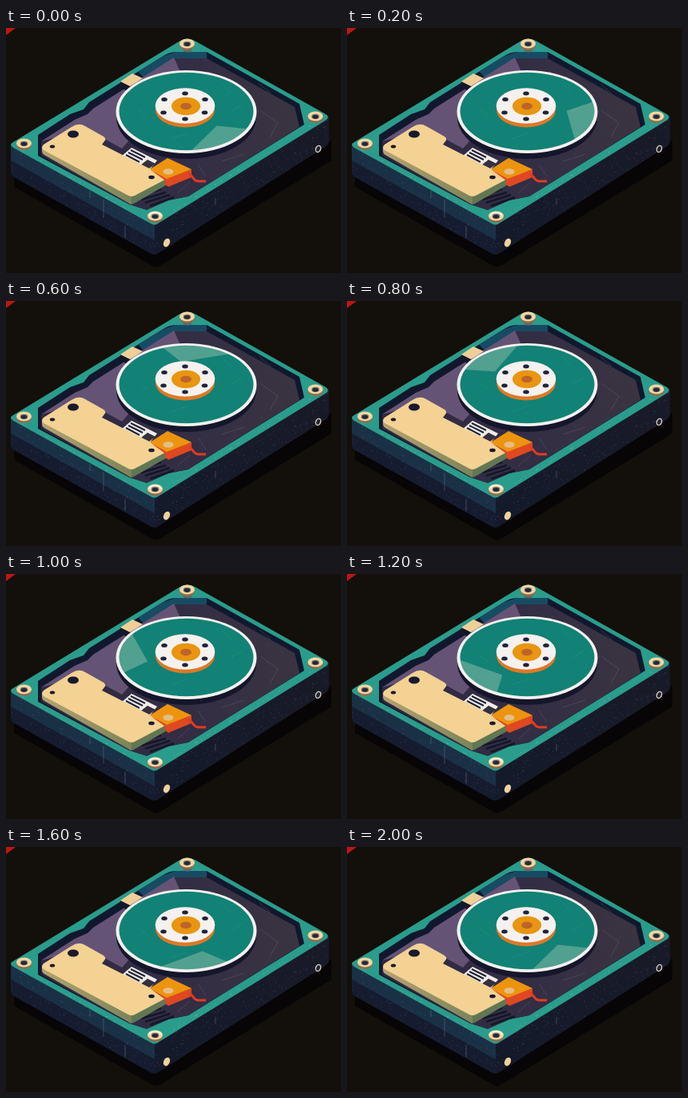
Animation, 419 px wide and 307 px high, one loop 2.1 s. Source, as an HTML page:

```html
<!DOCTYPE html>
<html lang="en">
<head>
<meta charset="utf-8">
<title>Hard disk</title>
<style>
html, body { margin: 0; width: 100%; height: 100%; overflow: hidden; background: #130f0b; }
svg { display: block; width: 419px; height: 307px; }
</style>
</head>
<body>
<svg viewBox="0 0 419 307">
  <defs>
    <clipPath id="wellClip"><path id="wellShape" d="M40 134L80 108L97 102L104 93L195 36Q204 30 212 30H251L367 95L373 121L228 211L203 216L176 228L154 221L40 160Z"/></clipPath>
    <clipPath id="sideClip"><path d="M6 148L186 248L404 112V145L186 284L7 184Z"/></clipPath>
    <linearGradient id="floor" x1="0" x2="1"><stop offset="0" stop-color="#2e2942"/><stop offset=".6" stop-color="#332e44"/><stop offset="1" stop-color="#3a3441"/></linearGradient>
    <linearGradient id="right" x1="0" x2="1"><stop offset="0" stop-color="#141a2b"/><stop offset="1" stop-color="#191a28"/></linearGradient>
    <linearGradient id="rim" x1="0" x2="1"><stop offset="0" stop-color="#b5a371"/><stop offset="1" stop-color="#7b8459"/></linearGradient>
    <g id="screw">
      <ellipse cy="2.5" rx="9.5" ry="6" fill="#8f6b4c"/>
      <ellipse rx="9.5" ry="6" fill="#f3d6a2"/>
      <ellipse cy=".5" rx="4.8" ry="3.2" fill="#77706c"/>
      <ellipse cy=".8" rx="3.6" ry="2.4" fill="#25273a"/>
    </g>
  </defs>

  <path d="M0 0H12L0 9Z" fill="#bd1712"/>
  <path d="M10 184V199L183 298Q188 301 194 297L407 166V140L186 276Z" fill="#070505"/>

  <!-- case -->
  <path d="M6 146L186 246V284Q182 284 178 281L10 187Q6 185 6 180Z" fill="#151c30"/>
  <path d="M6 146L186 246V266L6 166Z" fill="#1a3045"/>
  <path d="M186 246L404 110V141Q404 146 399 149L191 282Q188 284 186 284Z" fill="url(#right)"/>
  <g clip-path="url(#sideClip)">
    <path id="dust" stroke="#7a8294" stroke-width=".8" opacity=".5"/>
    <path d="M122 215V238M149 248V268M105 204V213M262 213V222" stroke="#71849a" stroke-width=".8" opacity=".55"/>
  </g>
  <path d="M9 143L217 16.5Q227 10.5 237 16.5L400 108Q405 111 401 115L190 245Q186 248 181 245L9 150Q3 146 9 143Z" fill="#2a9c8b"/>

  <!-- well -->
  <use href="#wellShape" fill="#11182d"/>
  <g clip-path="url(#wellClip)">
    <path d="M165 54L195 36L212 30H251V38H215L172 62Z" fill="#174b64"/>
    <path d="M44 142L86 115L102 108L109 101L209 38H251L361 99L367 124L228 211L203 216L176 228L154 221L44 160Z" fill="url(#floor)"/>
    <path d="M44 142L86 115L102 108L109 101L210 37L218 55L190 100L145 151L101 127Z" fill="#655375"/>
    <path d="M165 211L194 202M169 215L200 206M174 219L205 209M180 223L210 212" stroke="#141629" stroke-width="2.4"/>
    <path id="flecks" stroke="#827484" stroke-width=".7" opacity=".4"/>
    <path d="M318 103L340 119L330 137M270 167L298 158M240 171L250 186M214 207L230 193M317 70L331 82" stroke="#8d7b87" stroke-width=".6" fill="none" opacity=".45"/>
  </g>
  <path d="M143 67V74L155 81L171 71V64L156 73Z" fill="#15172b"/>
  <path d="M143 67L158 57L171 63L155 73Z" fill="#efcf98"/>

  <!-- platter -->
  <ellipse cx="225.5" cy="112" rx="87.5" ry="52" fill="#15162b"/>
  <ellipse cx="225.5" cy="105" rx="88" ry="52" fill="#f3f1ef"/>
  <ellipse cx="225.5" cy="104.5" rx="84" ry="48.8" fill="#118275"/>
  <path id="wear" stroke="#65a692" stroke-width=".7" opacity=".4"/>
  <path d="M166 102L179 112M206 139L226 132M269 69L281 82M281 105L296 96" stroke="#5ba18f" stroke-width=".6" opacity=".4"/>
  <g transform="translate(225.5 104.5) scale(84 48.8)">
    <path id="glint" fill="#fff0da" fill-opacity=".27"/>
  </g>
  <ellipse cx="224" cy="102.5" rx="37" ry="22" fill="#dd7926"/>
  <ellipse cx="224" cy="97.5" rx="37.3" ry="22.3" fill="#f4f1ee"/>
  <g id="holes" fill="#20233a"></g>
  <ellipse cx="225" cy="98" rx="18" ry="11.2" fill="#e9950f"/>
  <ellipse cx="225" cy="98" rx="7" ry="4.3" fill="#bd642b"/>

  <!-- head arm -->
  <path d="M144 161L157 150L189 166L178 180Z" fill="#f0ece8"/>
  <path d="M150 159L167 168M153 156L171 165M156 153L174 162" stroke="#202236" stroke-width="2"/>
  <path d="M168 172L177 165L187 170L178 177Z" fill="#34303c"/>

  <!-- bracket -->
  <path d="M45 150L157 211L200 187V197L160 220Q157 222 153 219L48 159Q45 157 45 154Z" fill="#617753"/>
  <path d="M45 150L157 211V221Q155 221 153 219L48 159Q45 157 45 154Z" fill="url(#rim)"/>
  <path d="M47 146L82 124Q91 118 99 123L122 136Q126 139 123 142L120 146L197 185Q202 188 197 191L161 210Q157 212 153 210L47 153Q43 150 47 146Z" fill="#f3d293"/>
  <ellipse cx="84" cy="133" rx="7" ry="4.6" fill="#191a2d"/>
  <ellipse cx="58" cy="148.5" rx="3.2" ry="2.1" fill="#191a2d"/>
  <ellipse cx="182" cy="187" rx="3.8" ry="2.3" fill="#191a2d"/>

  <!-- connector -->
  <path d="M181 178L201 188L232 177V187L203 199L199 196V191Z" fill="#df4820"/>
  <path d="M180 177L202 163L232 177L201 189Z" fill="#ed940f"/>
  <ellipse cx="203" cy="180" rx="6.5" ry="3.8" fill="#e5bd88"/>
  <path d="M229 182L235 189Q237 192 241 192H250" stroke="#df3d21" stroke-width="3" fill="none"/>

  <!-- screws -->
  <path d="M220 22L222 29Q227 32 232 29L234 22Z" fill="#5c6a68"/>
  <use href="#screw" x="226.5" y="19.5"/>
  <use href="#screw" x="387" y="110.5"/>
  <use href="#screw" x="22.5" y="144.5"/>
  <use href="#screw" x="186.5" y="235.5"/>
  <path d="M179 235.5a7.5 4.5 0 0 1 15 0" stroke="#f7efe2" stroke-width="2" fill="none"/>
  <ellipse cx="390.5" cy="151.5" rx="3" ry="4.2" transform="rotate(20 390.5 151.5)" fill="#242538" stroke="#d9d0bd" stroke-width="1.4"/>
  <ellipse cx="201" cy="269" rx="3.8" ry="5.5" transform="rotate(25 201 269)" fill="#f0d29b"/>
  <path id="chips" stroke="#b9e0d0" stroke-width=".8" opacity=".65"/>
</svg>
<script>
const byId = id => document.getElementById(id);
const TAU = Math.PI * 2;

let seed = 71;
const rand = () => (seed = seed * 16807 % 2147483647) / 2147483647;

function speckle(id, count, place) {
  let d = '';
  for (let i = 0; i < count; i++) {
    const [x, y] = place();
    d += `M${x.toFixed(1)} ${y.toFixed(1)}h.8`;
  }
  byId(id).setAttribute('d', d);
}
const inBox = (x, y, w, h) => () => [x + rand() * w, y + rand() * h];
speckle('dust', 1400, inBox(6, 110, 398, 174));
speckle('flecks', 320, inBox(40, 30, 332, 195));
speckle('wear', 70, () => {
  const a = rand() * TAU, r = Math.sqrt(rand()) * .97;
  return [225.5 + 84 * r * Math.cos(a), 104.5 + 48.8 * r * Math.sin(a)];
});
speckle('chips', 40, () => {
  const k = rand();
  return rand() < .5 ? [12 + 165 * k, 149 + 92 * k] : [196 + 195 * k, 237 - 121 * k];
});

byId('holes').innerHTML = [[224, 82], [249, 89.5], [248.5, 106], [224, 114], [197, 106], [198, 89.5]]
  .map(([x, y]) => `<ellipse cx="${x}" cy="${y}" rx="3.8" ry="2.5"/>`).join('');

// Glint on a unit disk: two rim points and one inner corner.
const polar = (deg, r) => [r * Math.cos(deg * TAU / 360), r * Math.sin(deg * TAU / 360)].map(v => v.toFixed(4)).join(' ');
const glint = byId('glint');
glint.setAttribute('d', `M${polar(29.5, 1)}L${polar(-17, .585)}L${polar(-29.5, 1)}A1 1 0 0 1 ${polar(29.5, 1)}Z`);

const bezier = (u, a, b) => 3 * (1 - u) ** 2 * u * a + 3 * (1 - u) * u * u * b + u ** 3;
function ease(x) {
  let lo = 0, hi = 1;
  for (let i = 0; i < 30; i++) {
    const mid = (lo + hi) / 2;
    if (bezier(mid, .19, .65) < x) lo = mid; else hi = mid;
  }
  return bezier(lo, .167, 1);
}

const STEP = 100, STEPS = 21;
function draw() {
  const step = Math.floor(performance.now() / STEP) % STEPS;
  const angle = 56 - 360 * ease(step / (STEPS - 1));
  glint.setAttribute('transform', `rotate(${angle.toFixed(2)})`);
  requestAnimationFrame(draw);
}
draw();
</script>
</body>
</html>
```
